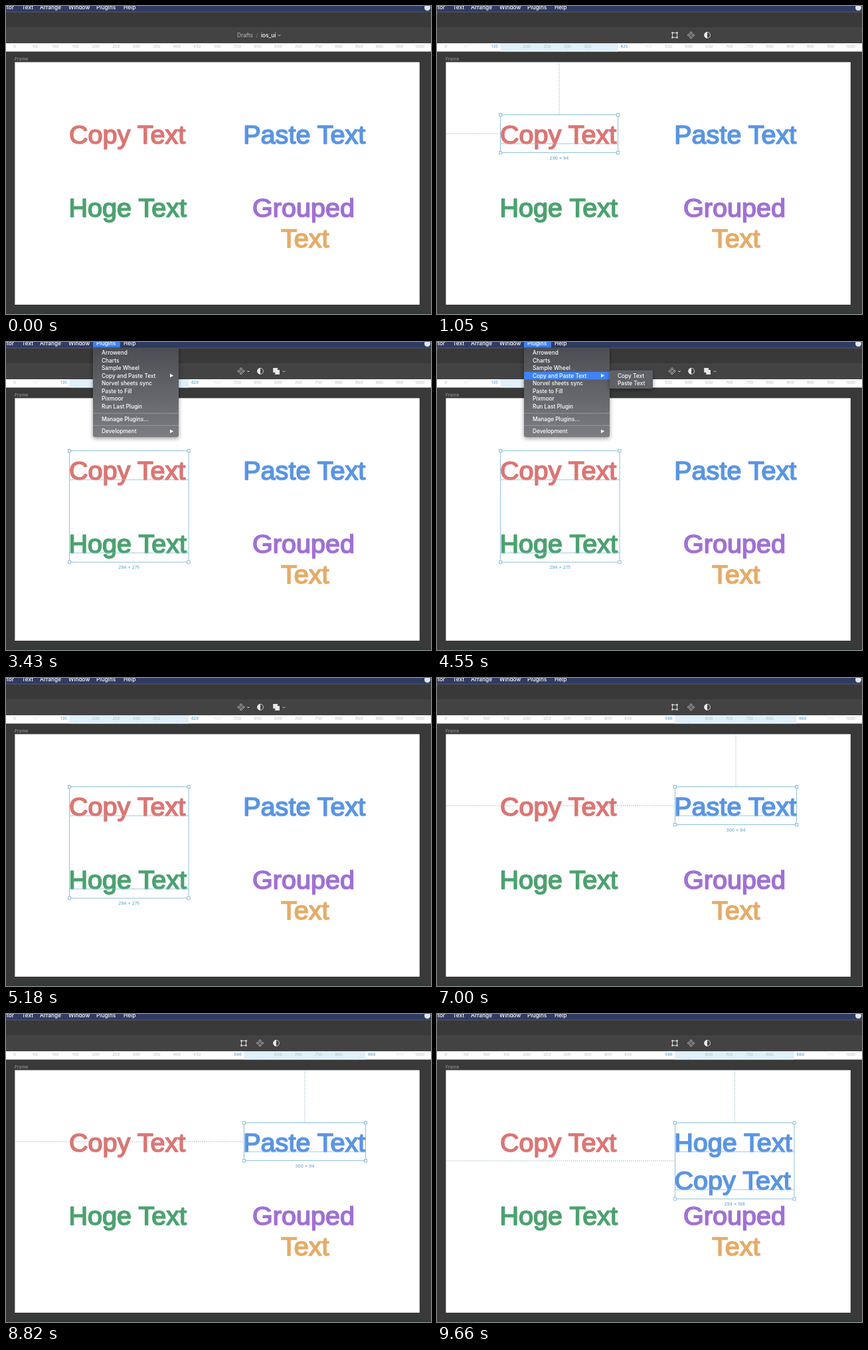
Write an HTML page that moves like this. It is 640 px wide and 463 px high and loops after 9.73 s.

```html
<!DOCTYPE html>
<html lang="en">
<head>
<meta charset="utf-8">
<title>Copy and paste text</title>
<style>
html, body { margin: 0; width: 100%; height: 100%; overflow: hidden; background: #393939; }
svg { display: block; width: 640px; height: 463px; font: 500 8.3px Inter, sans-serif; }
.big { font: 39.6px "Liberation Sans", Arial, sans-serif; stroke-width: 1.7; stroke-linejoin: round; }
.small { font-size: 6px; font-weight: 400; }
.icon { fill: none; stroke: #ddd; stroke-width: .9; }
.pop { filter: drop-shadow(0 2px 3px #0006); }
</style>
</head>
<body>
<svg id="stage" viewBox="0 0 640 463"></svg>
<script>
const LOOP = 9730, BLUE = '#5a95e2', LINE = '#84bad6';
const stage = document.getElementById('stage');

const rect = (x, y, w, h, fill, more = '') =>
  `<rect x="${x}" y="${y}" width="${w}" height="${h}" fill="${fill}" ${more}/>`;
const text = (x, y, str, fill, more = '') =>
  `<text x="${x}" y="${y}" fill="${fill}" ${more}>${str}</text>`;
const path = (d, more = '') => `<path d="${d}" ${more}/>`;
const big = (x, y, str, color) => text(x, y, str, color, `class="big" stroke="${color}"`);
const rulerX = n => 13.2 + n * .61;

// Selections: box, ruler range, size label, baselines, and whether it is one layer
const copySel = { x: 95.5, y: 163.5, w: 177, h: 57, from: 135, to: 425, size: '290 × 94', lines: [207], single: true };
const bothSel = { x: 95.5, y: 163.5, w: 179.5, h: 167.5, from: 135, to: 429, size: '294 × 275', lines: [207, 317] };
const pasteSel = { x: 358.5, y: 163.5, w: 183, h: 57, from: 566, to: 866, size: '300 × 94', lines: [207], single: true };
const pastedSel = { x: 358.5, y: 163.5, w: 179.5, h: 114.5, from: 566, to: 860, size: '294 × 188', lines: [207, 264], single: true };

// Each step holds until the next; row is the hovered menu item, sub the hovered submenu item
const steps = [
  { at: 0 },
  { at: 910, sel: copySel },
  { at: 1610, sel: bothSel },
  { at: 3430, sel: bothSel, menu: true, row: -1 },
  { at: 3780, sel: bothSel, menu: true, row: 1 },
  { at: 4060, sel: bothSel, menu: true, row: 3 },
  { at: 4690, sel: bothSel, menu: true, row: 3, sub: 0 },
  { at: 4900, sel: bothSel },
  { at: 6160, sel: pasteSel },
  { at: 7280, sel: pasteSel, menu: true, row: -1 },
  { at: 7700, sel: pasteSel, menu: true, row: 3 },
  { at: 8400, sel: pasteSel, menu: true, row: 3, sub: 1 },
  { at: 8750, sel: pasteSel },
  { at: 9100, sel: pastedSel, pasted: true },
];

const items = ['Arrowend', 'Charts', 'Sample Wheel', 'Copy and Paste Text',
  'Norvel sheets sync', 'Paste to Fill', 'Pixmoor', 'Run Last Plugin'];

function menuBar(open) {
  let out = rect(0, 0, 640, 9, '#303b63') + rect(0, 8.5, 640, 1, '#555a66');
  if (open) out += rect(131, 0, 41, 8.5, '#3f83f5');
  out += text(12, 4.5, 'Vector', '#fff', 'text-anchor="end"');
  [[24, 'Text'], [51, 'Arrange'], [94, 'Window'], [136, 'Plugins'], [177, 'Help']]
    .forEach(([x, s]) => out += text(x, 4.5, s, '#fff'));
  return out + '<circle cx="634.5" cy="2.5" r="4.5" fill="#e4e6ee"/>';
}

const chevron = x => path(`M${x - 1.8} 43.2l1.8 1.8 1.8-1.8`, 'class="icon"');
const diamonds = x => path([[0, -3.3], [3.3, 0], [0, 3.3], [-3.3, 0]]
  .map(([dx, dy]) => `M${x + dx} ${42 + dy}l1.8 1.8-1.8 1.8-1.8-1.8z`).join(''), 'class="icon"');
const mask = x => `<circle cx="${x}" cy="43.8" r="4.5" class="icon"/>` +
  path(`M${x} 39.3a4.5 4.5 0 0 0 0 9z`, 'fill="#e8e8e8"');
const union = x => rect(x - 4.8, 39, 6.8, 6.8, '#e8e8e8') + rect(x - 1.8, 42, 6.8, 6.8, '#e8e8e8');
const frameIcon = x => rect(x - 3.5, 40.3, 7, 7, 'none', 'class="icon"') +
  [x - 3.5, x + 3.5].map(cx => [40.3, 47.3].map(cy =>
    rect(cx - 1.2, cy - 1.2, 2.4, 2.4, '#ddd')).join('')).join('');

function toolbar(sel) {
  const base = rect(0, 9.5, 640, 22.5, '#393939') + rect(0, 32, 640, 24, '#434343');
  if (!sel) return base + text(348, 47, 'Drafts', '#aaa') + text(376.5, 47, '/', '#777') +
    text(384, 47, 'ios_ui', '#fff') + chevron(411.5);
  if (sel.single) return base + frameIcon(358) + diamonds(382.5) + mask(407);
  return base + diamonds(354) + chevron(365) + mask(383) + union(407) + chevron(418.5);
}

function ruler(sel) {
  let out = rect(0, 56, 640, 12.5, '#fff');
  const a = sel && rulerX(sel.from), b = sel && rulerX(sel.to);
  if (sel) out += rect(a, 56, b - a, 12.5, '#dff0fc');
  for (let n = 0; n <= 1000; n += 50) {
    const x = rulerX(n);
    let alpha = 1;
    if (sel) {
      const near = Math.min(Math.abs(x - a), Math.abs(x - b));
      if (x > a && x < b) alpha = near < 30 ? 0 : 1;
      else alpha = near < 42 ? 0 : near < 56 ? .45 : 1;
    }
    out += rect(x - .25, 66, .5, 2.5, '#ccc');
    if (alpha) out += text(x, 62.7, n, '#bcbcbc', `class="small" text-anchor="middle" opacity="${alpha}"`);
  }
  if (sel) {
    const bold = 'class="small" style="font-weight:600"';
    out += text(a - 3.5, 62.7, sel.from, '#6cb0d8', bold + ' text-anchor="end"') +
      text(b + 3.5, 62.7, sel.to, '#6cb0d8', bold);
  }
  return out;
}

function selection(s) {
  const right = s.x + s.w, bottom = s.y + s.h, cx = s.x + s.w / 2, cy = s.y + s.h / 2;
  let out = '';
  if (s.single) out += path(`M13 ${cy}H${s.x}M${cx} 84V${s.y}`,
    'stroke="#8fa6b4" stroke-width=".8" stroke-dasharray="1.5 1.5"');
  s.lines.forEach(y => out += path(`M${s.x} ${y}H${right}`, `stroke="${LINE}" stroke-width=".8"`));
  out += rect(s.x, s.y, s.w, s.h, 'none', `stroke="${LINE}" stroke-width=".9"`);
  for (const x of [s.x, right]) for (const y of [s.y, bottom])
    out += rect(x - 2.1, y - 2.1, 4.2, 4.2, '#fff', `stroke="${LINE}" stroke-width=".9"`);
  return out + text(cx, bottom + 10, s.size, '#74aacb', 'text-anchor="middle" style="font-size:6.6px"');
}

const arrow = y => path(`M247 ${y - 2.8}l5.2 2.8-5.2 2.8z`, 'fill="#fff"');

function menu({ row, sub }) {
  let out = '<g class="pop">' + path('M131 8.5H260V140a3 3 0 0 1-3 3H134a3 3 0 0 1-3-3z', 'fill="url(#glass)"') + '</g>';
  if (row >= 0) out += rect(131, 10.3 + row * 11.55, 129, 11.4, '#3f83f5');
  items.forEach((s, i) => out += text(144, 19 + i * 11.55, s, '#fff'));
  out += rect(131, 106.7, 129, .9, '#9a9a9e') + rect(131, 125, 129, .9, '#9a9a9e') +
    text(144, 118.5, 'Manage Plugins...', '#fff') + text(144, 137.2, 'Development', '#fff') +
    arrow(50.5) + arrow(134.3);
  if (row === 3) {
    out += '<g class="pop">' + rect(260, 42.5, 65, 27.5, '#606166', 'rx="2.5"') + '</g>';
    if (sub >= 0) out += rect(260, 44.9 + sub * 11.55, 65, 11.4, '#3f83f5');
    ['Copy Text', 'Paste Text'].forEach((s, i) => out += text(272, 53.6 + i * 11.55, s, '#fff'));
  }
  return out;
}

function draw(step) {
  const { sel, pasted } = step;
  stage.innerHTML = `<defs><linearGradient id="glass" x2="0" y2="1">
    <stop stop-color="#4c4d52"/><stop offset=".35" stop-color="#5d5e62"/>
    <stop offset=".6" stop-color="#68696d"/><stop offset="1" stop-color="#7d7e84"/></linearGradient></defs>` +
    rect(0, 0, 640, 463, '#393939') + toolbar(sel) + menuBar(step.menu) + ruler(sel) +
    text(13, 81.5, 'Frame', '#a0a0a0', 'style="font-size:6.8px;font-weight:400"') +
    rect(13.4, 84.4, 609.4, 364.6, '#fff') + rect(0, 461.5, 640, 1.5, '#06570c') +
    big(95, 207, 'Copy Text', '#da7674') + big(94.5, 317, 'Hoge Text', '#4ca270') +
    big(357.2, 207, pasted ? 'Hoge Text' : 'Paste Text', BLUE) +
    (pasted ? big(357.5, 264, 'Copy Text', BLUE) : '') +
    big(371, 317, 'Grouped', '#a071d2') + big(414, 362.5, 'Text', '#e6ab69') +
    (sel ? selection(sel) : '') + (step.menu ? menu(step) : '');
}

let shown;
function tick() {
  const t = performance.now() % LOOP;
  const step = steps.findLast(s => s.at <= t);
  if (step !== shown) draw(shown = step);
  requestAnimationFrame(tick);
}
tick();
</script>
</body>
</html>
```
